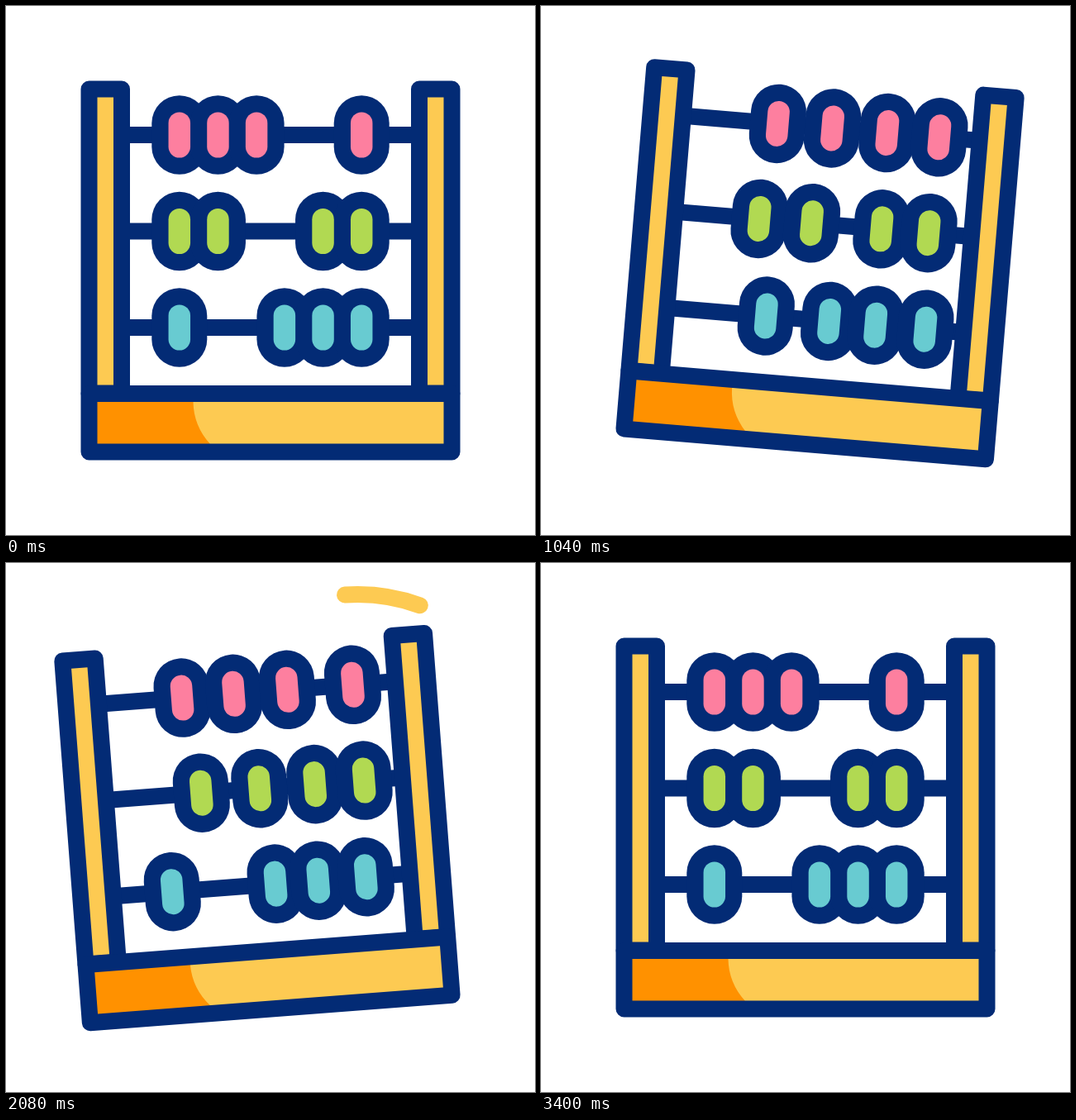
An HTML page with a canvas that plays this animation: 640 px wide and 640 px high, repeating every 3.56 s.

```html
<!DOCTYPE html>
<html lang="en">
<head>
<meta charset="utf-8">
<title>Abacus</title>
<style>
  html, body { margin: 0; width: 100%; height: 100%; overflow: hidden; background: #fff; }
  canvas { display: block; width: 640px; height: 640px; }
</style>
</head>
<body>
<canvas id="stage" width="640" height="640"></canvas>
<script>
const ctx = document.getElementById('stage').getContext('2d');
const LOOP = 3560, STEP = 20;
const NAVY = '#032b75', YELLOW = '#fdca52', ORANGE = '#ff9100';
const PIVOT = { x: 320, y: 530 };
const PITCH = 46.65;

// left: beads resting on the left side. Two waves, split at mid, push the beads;
// lean is a steady slide during the shake, kick the reach of a wave.
const ROWS = [
  { y: 156, color: '#fd7f9f', left: 3, from: 690, mid: 1470, to: 2690, gain: [1, 0.6],
    lean: [10, 20, 36, 14], kick: [36, 46, 50, 7] },
  { y: 272.5, color: '#b1d952', left: 2, from: 400, mid: 1390, to: 2770, gain: [0.88, 1],
    lean: [0, 0, 0, 5], kick: [46, 70, 10, 18] },
  { y: 389, color: '#68cbd1', left: 1, from: 380, mid: 2000, to: 3400, gain: [1, 1.1],
    lean: [0, 0, 5, 16], kick: [55, 0, 5, 8] }
];

const clamp = u => Math.max(0, Math.min(1, u));
const smooth = (t, from, to) => {
  const u = clamp((t - from) / (to - from));
  return u * u * (3 - 2 * u);
};
const pulse = (t, from, to) => Math.sin(Math.PI * clamp((t - from) / (to - from))) ** 2;

const jump = t => -43.7 * Math.max(0, 1 - ((t - 655) / 435) ** 2);

const tilt = t => 5 * (smooth(t, 531, 1110) - 2 * smooth(t, 1110, 1833) + smooth(t, 1833, 2957));

function beadX(row, i, t) {
  const rest = i < row.left ? 209.8 + PITCH * i : 430.2 - PITCH * (3 - i);
  const shake = smooth(t, 220, 600) - smooth(t, 2800, 3400);
  const wave = row.gain[0] * pulse(t, row.from, row.mid) + row.gain[1] * pulse(t, row.mid, row.to);
  return rest + row.lean[i] * shake + row.kick[i] * wave;
}

function line(x1, y1, x2, y2, width, color, cap = 'round') {
  ctx.lineCap = cap;
  ctx.lineWidth = width;
  ctx.strokeStyle = color;
  ctx.beginPath();
  ctx.moveTo(x1, y1);
  ctx.lineTo(x2, y2);
  ctx.stroke();
}

function outline(x, y, w, h) {
  ctx.lineJoin = 'round';
  ctx.lineWidth = 20;
  ctx.strokeStyle = NAVY;
  ctx.strokeRect(x, y, w, h);
}

function post(x) {
  ctx.fillStyle = YELLOW;
  ctx.fillRect(x, 100.5, 39.5, 368);
  outline(x, 100.5, 39.5, 368);
}

function base() {
  ctx.fillStyle = YELLOW;
  ctx.fillRect(100.5, 469, 439, 70.5);
  ctx.fillStyle = ORANGE;
  ctx.beginPath();
  ctx.moveTo(101, 470);
  ctx.lineTo(226.5, 470);
  ctx.lineTo(226.5, 479);
  ctx.quadraticCurveTo(227, 508, 247, 530);
  ctx.lineTo(247, 538);
  ctx.lineTo(101, 538);
  ctx.fill();
  outline(100.5, 469, 439, 70.5);
}

function beads(row, t) {
  const { y, color, kick } = row;
  const xs = kick.map((_, i) => beadX(row, i, t));
  line(140, y, 500, y, 20, NAVY, 'butt');
  for (const x of xs) line(x, y - 14.3, x, y + 14.3, 67, NAVY);
  for (const x of xs) line(x, y - 14.3, x, y + 14.3, 26.5, color);
}

// Swoosh beside the top right corner; 0 is its upper end, 1 its lower end
function swoosh(from, to) {
  if (to - from < 0.002) return;
  const angle = p => (-94.7 + 140.7 * p) * Math.PI / 180;
  ctx.lineCap = 'round';
  ctx.lineWidth = 20;
  ctx.strokeStyle = YELLOW;
  ctx.beginPath();
  ctx.ellipse(425, 186, 183, 148, 0, angle(from), angle(to));
  ctx.stroke();
}

function draw(t) {
  ctx.fillStyle = '#fff';
  ctx.fillRect(0, 0, 640, 640);

  swoosh(1 - smooth(t, 1480, 1830), 1 - smooth(t, 1620, 1960));
  swoosh(smooth(t, 2110, 2390), smooth(t, 2000, 2273));

  ctx.save();
  ctx.translate(PIVOT.x, PIVOT.y + jump(t));
  ctx.rotate(tilt(t) * Math.PI / 180);
  ctx.translate(-PIVOT.x, -PIVOT.y);
  for (const row of ROWS) beads(row, t);
  post(100.5);
  post(500);
  base();
  ctx.restore();
}

const start = performance.now();
function tick() {
  const t = (performance.now() - start) % LOOP;
  draw(Math.floor(t / STEP) * STEP);
  requestAnimationFrame(tick);
}
draw(0);
requestAnimationFrame(tick);
</script>
</body>
</html>
```
